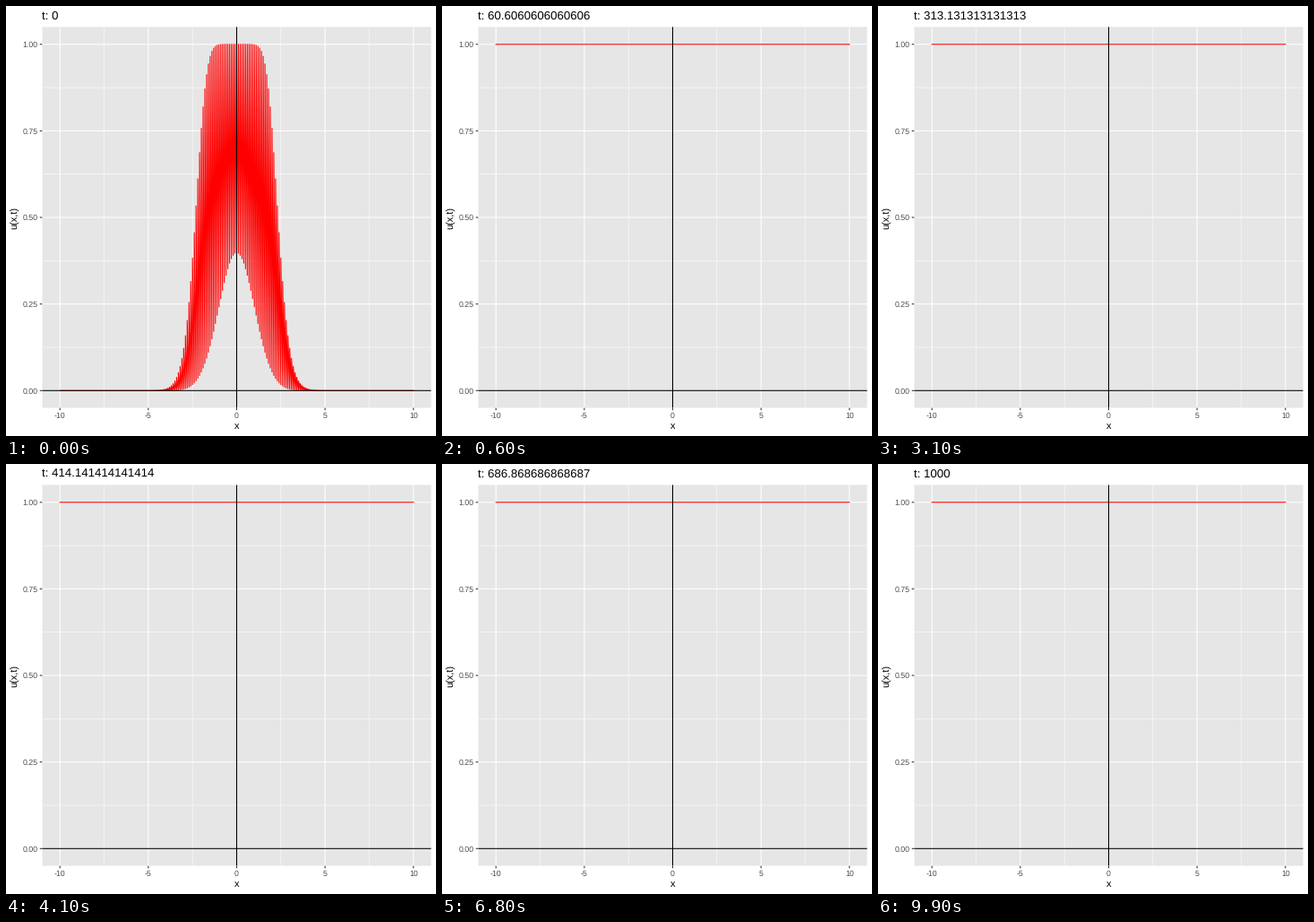
A matplotlib script that plays this animation: 480x480 px, repeating every 10 s.

```python
import numpy as np
import matplotlib.pyplot as plt
from matplotlib.animation import FuncAnimation
from matplotlib.patches import PathPatch, Rectangle
from matplotlib.path import Path

plt.rcParams["font.family"] = "Liberation Sans"
plt.rcParams["text.hinting"] = "no_hinting"
plt.rcParams["path.simplify"] = False
plt.rcParams["path.snap"] = False

SIZE, DPI = 480, 72
FRAMES, INTERVAL = 100, 100
T_END = 1000
LEFT, RIGHT, TOP, BOTTOM = 40.5, 474.5, 23.4, 448.5
LW = 1.07

# Reaction-diffusion model: u_t = D u_xx - r (1 - u) ln(1 - u)
RATE, DIFF = 0.64, 0.0048
DX, SUBSTEPS = 0.1, 4
T_SETTLED = 120


def px(x):
    return 257.5 + 19.73 * np.asarray(x)


def py(u):
    return 429.3 - 386.55 * np.asarray(u)


def solve(x):
    """Return u at every whole time until the front has settled."""
    u = np.exp(-x**2 / 2) / np.sqrt(2 * np.pi)
    dt = 1 / SUBSTEPS
    spread = DIFF * dt / DX**2
    growth = np.exp(RATE * dt)
    states = [u]
    for _ in range(T_SETTLED):
        for _ in range(SUBSTEPS):
            pad = np.pad(u, 1, mode="edge")
            u = u + spread * (pad[2:] - 2 * u + pad[:-2])
            u = np.minimum(u, 1 - 1e-12)
            u = -np.expm1(growth * np.log1p(-u))
        states.append(u)
    return np.array(states)


def quads(x0, x1, top0, bot0, top1, bot1):
    corners = [(x0, top0), (x1, top1), (x1, bot1), (x0, bot0)]
    return np.array(corners).transpose(2, 0, 1)


def zigzag(xs, start, end):
    """Outline of a line running start -> end at each x, then on to the next.

    The stroke is cut into touching, non-overlapping quads so that its
    dense parts keep their true coverage.
    """
    h = LW / 2
    bars = quads(xs - h, xs + h,
                 *[np.minimum(start, end) - h, np.maximum(start, end) + h] * 2)
    a, b = end[:-1], start[1:]
    step = (b - a) * LW / np.diff(xs)
    links = quads(xs[:-1] + h, xs[1:] - h,
                  np.minimum(a, a + step) - h, np.maximum(a, a + step) + h,
                  np.minimum(b, b - step) - h, np.maximum(b, b - step) + h)
    shapes = np.concatenate([bars, links])
    verts = np.concatenate([shapes, shapes[:, :1]], axis=1).reshape(-1, 2)
    codes = [Path.MOVETO] + [Path.LINETO] * 3 + [Path.CLOSEPOLY]
    return Path(verts, codes * len(shapes))


x = np.linspace(-10, 10, 201)
states = solve(x)
times = np.arange(T_END + 1)
slots = np.rint(times * (FRAMES - 1) / T_END).astype(int)

fig = plt.figure(figsize=(SIZE / DPI, SIZE / DPI), dpi=DPI, facecolor="white")
ax = fig.add_axes([0, 0, 1, 1])
ax.set_xlim(0, SIZE)
ax.set_ylim(SIZE, 0)
ax.axis("off")


def segment(xs, ys, color, width=LW, z=1):
    ax.plot(xs, ys, color=color, lw=width, zorder=z,
            solid_capstyle="butt", snap=False)


def vline(v, color, width=LW, z=1):
    segment([px(v)] * 2, [TOP, BOTTOM], color, width, z)


def hline(v, color, width=LW, z=1):
    segment([LEFT, RIGHT], [py(v)] * 2, color, width, z)


def label(x0, y0, text, size, color="black", **kw):
    return ax.text(x0, y0, text, fontsize=size, color=color, **kw)


ax.add_patch(Rectangle((LEFT, TOP), RIGHT - LEFT, BOTTOM - TOP,
                       facecolor="#e6e6e6", lw=0, zorder=0, snap=False))

for v in (-7.5, -2.5, 2.5, 7.5):
    vline(v, "white", LW / 2)
for v in (0.125, 0.375, 0.625, 0.875):
    hline(v, "white", LW / 2)

for v in (-10, -5, 0, 5, 10):
    vline(v, "white", z=2)
    segment([px(v)] * 2, [BOTTOM, BOTTOM + 2.75], "#333333")
    label(px(v), 460.2, str(v), 8.8, "#4d4d4d", ha="center", va="baseline")
for v in (0, 0.25, 0.5, 0.75, 1):
    hline(v, "white", z=2)
    segment([LEFT - 2.75, LEFT], [py(v)] * 2, "#333333")
    label(35.6, py(v) + 3.2, f"{v:.2f}", 8.8, "#4d4d4d",
          ha="right", va="baseline")

hline(0, "black", z=5)
vline(0, "black", z=5)
label(257.5, 472.4, "x", 11, ha="center", va="baseline")
label(15, 236, "u(x,t)", 11, ha="right", va="center", rotation=90)
title = label(40.5, 15, "", 13.2, ha="left", va="baseline")

curve = PathPatch(Path([(0, 0)]), facecolor="red", lw=0, zorder=4, snap=False)
ax.add_patch(curve)


def update(i):
    # All whole times nearest to this step share one line, ordered by x
    group = np.minimum(times[slots == i], T_SETTLED)
    curve.set_path(zigzag(px(x), py(states[group[0]]), py(states[group[-1]])))
    title.set_text(f"t: {i * T_END / (FRAMES - 1):.15g}")
    return curve, title


anim = FuncAnimation(fig, update, frames=FRAMES, interval=INTERVAL,
                     repeat=True, repeat_delay=0)
plt.show()
```
